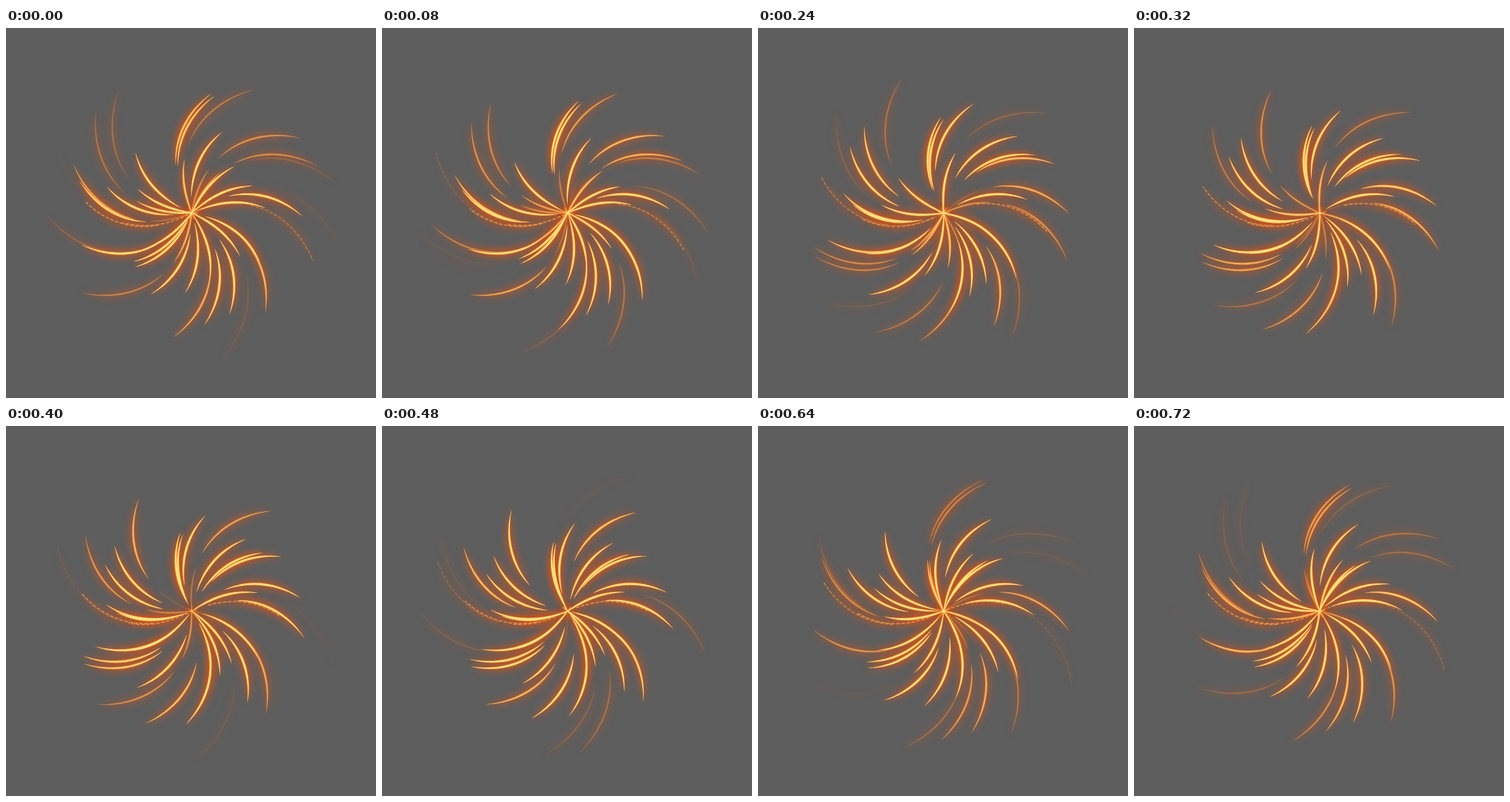
These frames come from a looping animation (512 px wide and 512 px high, 800 ms). An HTML page with a canvas:

```html
<!DOCTYPE html>
<html lang="en">
<head>
<meta charset="utf-8">
<title>Spiral sparks</title>
<style>
html, body { margin: 0; width: 100%; height: 100%; overflow: hidden; background: #5e5e5e; }
canvas { display: block; width: 512px; height: 512px; }
</style>
</head>
<body>
<canvas id="stage" width="512" height="512"></canvas>
<script>
const ctx = document.getElementById('stage').getContext('2d');
const LOOP = 800, STEP = 80;
const CX = 257, CY = 256;
const SPEED = .145, LENGTH = 98, REACH = 214;   // px per ms, px, starting radius
const FADE_IN = 380, FADE_OUT = 200, LIFE = 1120;
const FIRST = -460, GAP = 20.4;                 // a steady emitter, in ms
const OVERSHOOT = 10;                           // heads poke a little past the centre

// Direction of each spark at the centre, in order of emission.
const angles = [
  207, -36, 33, -48, 232.5, 201.3, 117.5, 120, -13, -57, 200,
  22, 79, 66, 262.2, 110.5, 181.3, 170.3, 231.5, 63.3, -25.5, 41,
  206, -57, 23.5, 240.3, 245, -72.7, 156, -12.2, 94, 188.3, 269.6
];
const sparks = angles.map((angle, i) => ({
  angle,
  birth: FIRST + i * GAP,
  dashed: i % 11 === 0
}));

// Every spark slides along the same spiral, turned to its own angle.
function spiral(angle, r) {
  const a = (angle - .0303 * Math.pow(Math.abs(r), 1.4)) * Math.PI / 180;
  return [CX + r * Math.cos(a), CY - r * Math.sin(a)];
}

function curve(angle, head, tail) {
  const n = 32;
  return Array.from({ length: n + 1 }, (_, i) => spiral(angle, head + (tail - head) * i / n));
}

function fillTaper(pts, width) {
  const left = [], right = [], last = pts.length - 1;
  pts.forEach(([x, y], i) => {
    const p = pts[Math.max(0, i - 1)], q = pts[Math.min(last, i + 1)];
    const dx = q[0] - p[0], dy = q[1] - p[1], len = Math.hypot(dx, dy) || 1;
    const w = width / 2 * Math.pow(Math.max(0, Math.sin(Math.PI * i / last)), .8);
    left.push([x - dy / len * w, y + dx / len * w]);
    right.unshift([x + dy / len * w, y - dx / len * w]);
  });
  ctx.beginPath();
  left.concat(right).forEach(p => ctx.lineTo(p[0], p[1]));
  ctx.closePath();
  ctx.fill();
}

function strokeDashes(pts, alpha) {
  ctx.strokeStyle = `rgba(255,165,75,${.75 * alpha})`;
  ctx.lineWidth = 1.5;
  ctx.setLineDash([5, 2]);
  ctx.beginPath();
  pts.forEach(p => ctx.lineTo(p[0], p[1]));
  ctx.stroke();
  ctx.setLineDash([]);
}

// All streaks alive at time t, including those born in an earlier round.
function live(t) {
  const out = [];
  for (const { angle, birth, dashed } of sparks) {
    for (let k = -1; k <= 2; k++) {
      const age = t + k * LOOP - birth;
      const alpha = Math.min(1, age / FADE_IN, (LIFE - age) / FADE_OUT);
      if (alpha <= 0) continue;
      const tail = REACH - SPEED * age;
      const head = Math.max(-OVERSHOOT, tail - LENGTH);
      out.push({ pts: curve(angle, head, tail), alpha, dashed });
    }
  }
  return out;
}

function draw(t) {
  const streaks = live(t), solid = streaks.filter(s => !s.dashed);
  ctx.fillStyle = '#5e5e5e';
  ctx.fillRect(0, 0, 512, 512);

  ctx.filter = 'blur(5px)';
  for (const s of streaks) {
    ctx.fillStyle = `rgba(222,84,22,${(s.dashed ? .35 : .6) * s.alpha})`;
    fillTaper(s.pts, 12);
  }
  ctx.filter = 'none';

  for (const s of streaks) {
    if (s.dashed) strokeDashes(s.pts, s.alpha);
  }
  for (const s of solid) {
    ctx.fillStyle = `rgba(247,115,34,${.85 * s.alpha})`;
    fillTaper(s.pts, 1.8 + 2.6 * s.alpha);
  }
  for (const s of solid) {
    ctx.fillStyle = `rgba(255,230,128,${s.alpha ** 1.5})`;
    fillTaper(s.pts, 1 + 1.6 * s.alpha);
  }
}

const start = performance.now();
let shown = -1;
function tick() {
  const t = Math.floor((performance.now() - start) % LOOP / STEP) * STEP;
  if (t !== shown) draw(shown = t);
  requestAnimationFrame(tick);
}
tick();
</script>
</body>
</html>
```
